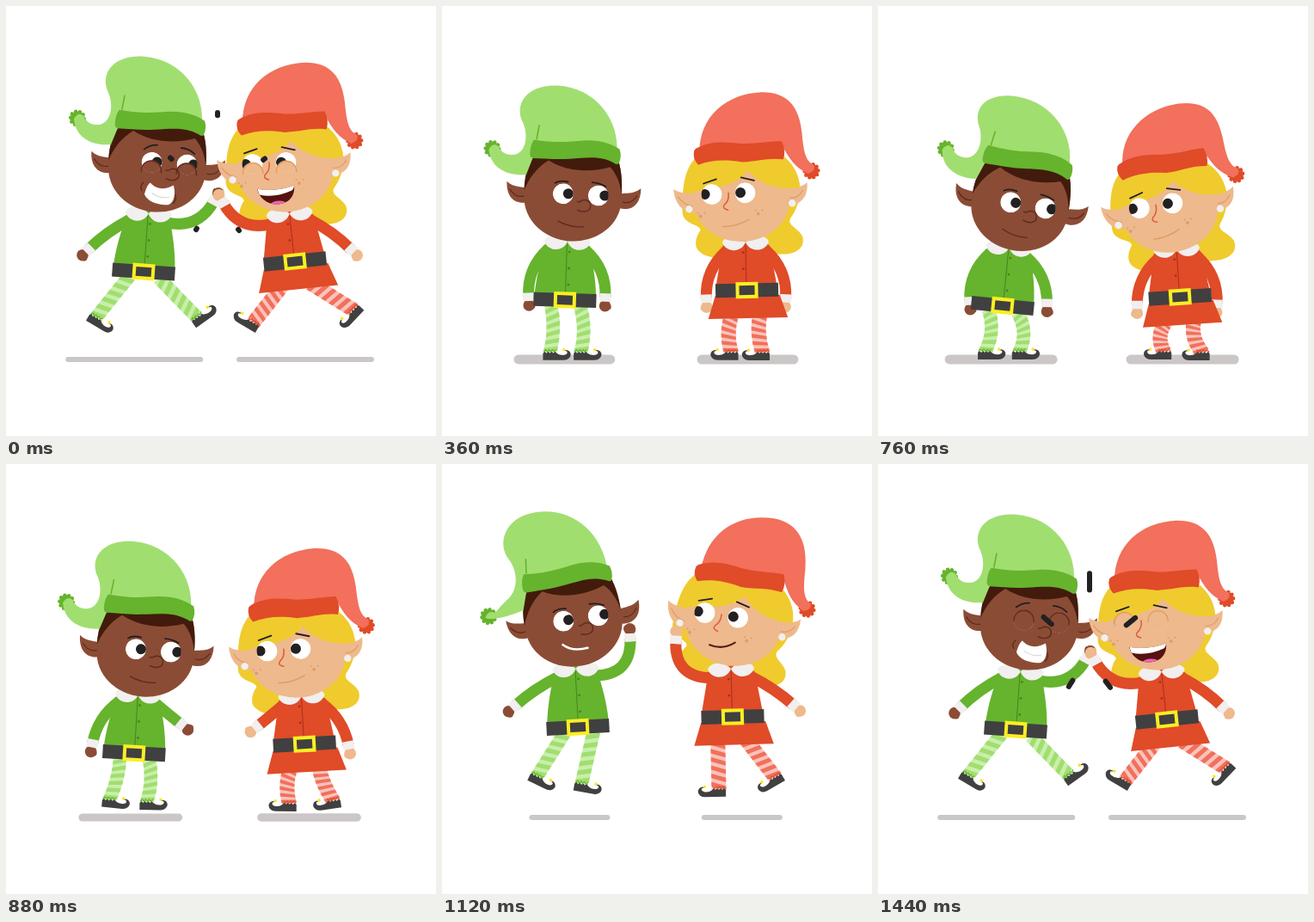
Write an HTML page with a canvas that moves like this. It is 500 by 500 pixels and loops after 1.48 s.

```html
<!DOCTYPE html>
<html lang="en">
<head>
<meta charset="utf-8">
<title>Elf high five</title>
<style>
html, body { margin: 0; width: 100%; height: 100%; overflow: hidden; background: #fff; }
canvas { display: block; width: 100vw; height: 100vh; }
</style>
</head>
<body>
<canvas id="stage" width="500" height="500"></canvas>
<script>
const c = document.getElementById('stage').getContext('2d');
const LOOP = 1480, GROUND = 404, DARK = '#404040', INK = '#232021', WHITE = '#f1efef', YELLOW = '#f0cb2d';

const mix = (a, b, k) => a + (b - a) * k;
const clamp = v => Math.min(1, Math.max(0, v));
const fall = k => k ** 1.7, steady = k => k;
const settle = k => Math.sin(k * Math.PI / 2), smooth = k => k * k * (3 - 2 * k);

const steps = [
  [0, 'hit', fall], [200, 'land', settle], [520, 'rest', steady], [640, 'rest', smooth],
  [780, 'land', steady], [1120, 'wind', smooth], [1220, 'hit', steady], [LOOP, 'hit']
];
// Both elves share these, mirrored: hands measured from the shoulders
const gesture = {
  hit: { trail: [47, 34], reach: [56, -25], shadow: 160 },
  land: { trail: [23, 55], reach: [24, 53], shadow: 132 },
  rest: { trail: [23, 56], reach: [23, 56], shadow: 112 },
  wind: { trail: [49, 33], reach: [42, -44], shadow: 94 }
};
// head and body: x, y, degrees; feet: left x, y, right x, y
const boy = {
  skin: '#8b4c36', main: '#66b32d', hat: '#a1de70', sock: '#c9efab', seam: '#45851c', dir: 1,
  headAt: [146, 220], bodyAt: [142, 339], shoulders: [[121, 280], [164, 280]], hips: [[126, 345], [160, 345]], legWidth: 15.5,
  hit: { head: [175, 191, 4], body: [160, 309, 4], feet: [104, 363, 223, 363] },
  land: { head: [165, 237, 10.5], body: [145, 349, 6], feet: [124, 403, 164, 403] },
  rest: { head: [146, 220, 0], body: [142, 339, 0], feet: [126, 404, 160, 404] },
  wind: { head: [153, 187, -9], body: [158, 306, -3], feet: [110, 364, 162, 373] }
};
const girl = {
  skin: '#eeb98c', main: '#e04b28', hat: '#f2705c', sock: '#f9c4bb', seam: '#a8301a', dir: -1,
  headAt: [352, 220], bodyAt: [356, 327], shoulders: [[333, 281], [379, 281]], hips: [[338, 354], [371, 354]], legWidth: 17,
  hit: { head: [324, 191, -3], body: [336, 297, -6], feet: [287, 369, 405, 354] },
  land: { head: [338, 239, -9], body: [351, 339, -4], feet: [333, 403, 378, 404] },
  rest: { head: [352, 220, 0], body: [356, 327, 0], feet: [338, 404, 371, 404] },
  wind: { head: [338, 186, 8.6], body: [338, 294, -1.5], feet: [322, 379, 388, 365] }
};

const fill = (p, color) => { c.fillStyle = color; c.fill(new Path2D(p)); };
function line(p, color, w, cap = 'round') {
  c.strokeStyle = color; c.lineWidth = w; c.lineCap = cap; c.lineJoin = 'round';
  c.stroke(new Path2D(p));
}
function dot(x, y, r, color, ry = r) {
  c.fillStyle = color; c.beginPath(); c.ellipse(x, y, r, ry, 0, 0, 7); c.fill();
}
function within(at, [x, y, deg], draw) {
  c.save();
  c.translate(x, y); c.rotate(deg * Math.PI / 180); c.translate(-at[0], -at[1]);
  draw();
  c.restore();
}
function place([px, py], [ox, oy], [x, y, deg]) {
  const a = deg * Math.PI / 180, dx = px - ox, dy = py - oy;
  return [x + dx * Math.cos(a) - dy * Math.sin(a), y + dx * Math.sin(a) + dy * Math.cos(a)];
}

// Index of the step that holds at time t
function stepAt(list, t) {
  let i = 0;
  while (i < list.length - 2 && t >= list[i + 1][0]) i++;
  return i;
}
function track(list, t) {
  const i = stepAt(list, t), [a, b] = [list[i], list[i + 1]];
  return mix(a[1], b[1], clamp((t - a[0]) / (b[0] - a[0])));
}
function poseOf(elf, t) {
  const i = stepAt(steps, t), [a, b] = [steps[i], steps[i + 1]];
  const k = a[2]((t - a[0]) / (b[0] - a[0]));
  const from = { ...elf[a[1]], ...gesture[a[1]] }, to = { ...elf[b[1]], ...gesture[b[1]] };
  const pose = {};
  for (const part in from)
    pose[part] = Array.isArray(from[part]) ? from[part].map((v, n) => mix(v, to[part][n], k)) : mix(from[part], to[part], k);
  return pose;
}

function drawShadow(x, width, air) {
  const h = mix(11, 6, air), half = (width - h) / 2;
  line(`M${x - half},411 H${x + half}`, '#cbc7c7', h);
}

// The knee bends forward as far as the leg is shortened; in the air the foot follows the leg
function drawLeg(elf, [hx, hy], ax, ay) {
  const air = clamp((GROUND - ay) / 25), half = (GROUND - elf.hips[0][1]) / 2;
  const d = Math.hypot(ax - hx, ay - hy) / 2;
  const bend = .75 * (1 - air) * Math.sqrt(Math.max(0, half * half - d * d));
  const kx = (hx + ax) / 2 + elf.dir * bend, ky = (hy + ay) / 2, r = elf.legWidth / 2;
  line(`M${hx},${hy} Q${kx},${ky} ${ax},${ay}`, elf.sock, 2 * r, 'butt');
  const edge = (t, side) => {
    t = Math.min(t, 1);
    const u = 1 - t, dx = u * (kx - hx) + t * (ax - kx), dy = u * (ky - hy) + t * (ay - ky), n = side * r / Math.hypot(dx, dy);
    return [u * u * hx + 2 * u * t * kx + t * t * ax - dy * n, u * u * hy + 2 * u * t * ky + t * t * ay + dx * n];
  };
  for (let t = 0; t < .96; t += 1 / 6)
    fill(`M${edge(t, -elf.dir)} L${edge(t + .09, -elf.dir)} L${edge(t + .18, elf.dir)} L${edge(t + .09, elf.dir)}Z`, elf.hat);
  c.save();
  c.translate(ax, ay); c.rotate(.8 * air * Math.atan2(hx - ax, ay - hy)); c.scale(elf.dir, 1);
  fill('M-8,0 l2,-2 2,2 2,-2 2,2 2,-2 2,2 2,-2 2,2 Q12,3 17,2 Q21,1 20,-2 Q18,-3 16,-3 Q20,-5 23,-2 Q26,2 22,6 Q20,8 16,8 H-8Z', DARK);
  line('M-7,-2 l2,-2 2,2 2,-2 2,2 2,-2 2,2 2,-2', elf.main, 1.2);
  dot(16.5, -4, 1.8, '#fbe823');
  c.restore();
}

// The elbow swings from outside to below as the hand rises
function armOf([sx, sy], [dx, dy], side) {
  const x = sx + side * dx, y = sy + dy, d = Math.hypot(dx, dy), bend = side * (11.5 - 27 * dy / 58);
  const bx = (sx + x) / 2 - bend * dy / d, by = (sy + y) / 2 + bend * side * dx / d;
  const len = Math.hypot(x - bx, y - by);
  return { sx, sy, bx, by, x, y, ux: (x - bx) / len, uy: (y - by) / len };
}
function drawHand(elf, { x, y, ux, uy }) {
  dot(x + ux * 10, y + uy * 10, 6.8, elf.skin);
  dot(x + ux * 11 + uy * 4 * elf.dir, y + uy * 11 - ux * 4 * elf.dir, 3.2, elf.skin);
  line(`M${x - ux * 4.5},${y - uy * 4.5} L${x + ux * 5},${y + uy * 5}`, WHITE, 13, 'butt');
}
function drawArm(elf, a) {
  line(`M${a.sx},${a.sy} Q${a.bx},${a.by} ${a.x},${a.y}`, elf.main, 13, 'butt');
  dot(a.sx, a.sy, 6.5, elf.main);
  drawHand(elf, a);
}

function drawCollar(x, y) {
  for (const s of [-1, 1])
    fill(`M${x},${y} C${x + s * 9},${y - 10} ${x + s * 25},${y - 8} ${x + s * 27},${y} C${x + s * 23},${y + 12} ${x + s * 5},${y + 13} ${x},${y}Z`, WHITE);
}
function drawBelt(x, y) {
  fill(`M${x - 36.5},${y - 8} h73 v16 h-73Z`, DARK);
  c.strokeStyle = '#fbee23'; c.lineWidth = 4; c.lineJoin = 'miter';
  c.strokeRect(x - 11, y - 7.5, 22, 15);
}
function boyBody() {
  fill('M118,275 Q143,260 168,275 C173,295 177,312 178,333 H106.500 C108,314 112,295 118,275Z', boy.main);
  line('M142.500,274 V331', boy.seam, 1);
  for (const y of [283, 302, 321]) dot(145.5, y, 1.4, boy.seam);
  drawCollar(143, 271);
  drawBelt(142, 339);
}
function girlBody() {
  fill('M329,275 Q355,260 383,275 L391,322 H320Z', girl.main);
  fill('M319,333 H394 L403,359.500 H310.500Z', girl.main);
  line('M355.500,274 V319', girl.seam, 1);
  for (const y of [283, 302]) dot(352.5, y, 1.4, girl.seam);
  drawCollar(355.5, 271);
  drawBelt(356, 327);
}

function drawEye(x, y, look, lid, skin, edge) {
  c.save();
  c.beginPath(); c.arc(x, y, 12, 0, 7); c.clip();
  dot(x, y, 12, '#fff');
  dot(x + look, y - .5, 6, INK);
  if (lid < 24) dot(x, y + lid, 12.5, skin);
  c.restore();
  if (lid < 14) {
    c.strokeStyle = edge; c.lineWidth = 1.3;
    c.beginPath(); c.arc(x, y + lid, 11.6, Math.PI - .1, .1); c.stroke();
  }
}
function drawPom(x, y, color) {
  dot(x, y, 8, color);
  for (let i = 0; i < 10; i++) dot(x + 7.8 * Math.cos(i * Math.PI / 5), y + 7.8 * Math.sin(i * Math.PI / 5), 2.3, color);
}

// The crown sags or stretches by `sag`; the tail of a hat thrown back hangs down
function boyHead({ smile, lid, mouth }, sag) {
  const crease = '#5d2b1c', hang = Math.max(0, -8 * sag), tx = 50, ty = 166 + hang;
  fill('M69,203 C78,211 88,207 95,211 V226 C80,230 69,222 69,203Z M225,203 C216,211 208,208 200,211 V227 C215,231 226,222 225,203Z', boy.skin);
  line('M73,212 Q80,222 90,219 M221,212 Q215,222 205,220', crease, 1.2);
  const scalp = 'M89.500,212 C89,190 95,175 104,166 H194 C201,178 203,195 203,212';
  fill(scalp + 'Z', boy.skin);
  dot(146.5, 219, 56.5, boy.skin, 49.5);
  fill(scalp + ' C201,199 196,188 188,180 C165,188 137,188 116,176 C103,185 95,197 89.500,212Z', '#421b0d');
  c.save();
  c.translate(5 * smile, -3 * smile);
  drawEye(135, 214, 6, lid, boy.skin, crease);
  drawEye(176, 214, 7.5, lid, boy.skin, crease);
  const b = 4 * smile;
  line(`M125,${202 - b * .6} Q131,${198 - b} 140,${200 - b * 1.6} M168,${199 - b} Q177,${199 - b} 184,${203 - b * .5}`, INK, 1.8);
  line('M152,222 C156,224 156,219 162,220 C169,221 170,231 162,233 Q157,234 153,232', crease, 1.4);
  if (mouth === 2) {
    fill('M135,238 C143,246 153,245 162,239 C165,247 165,258 158,262 C146,264 133,260 129,252 C130,246 132,240 135,238Z', '#fff');
    line('M138,250 Q147,256 158,253', '#d8d4d4', 1);
    line('M127,238 Q122,243 126,248 M163,260 Q167,256 165,250', crease, 1.3);
  } else if (mouth === 1) line('M130,241 Q140,251 158,249', '#fff', 2.6);
  else line('M131,246 Q145,253 161,251', crease, 1.3);
  c.restore();
  drawPom(tx, ty, boy.main);
  fill(`M195,164 C196,${122 + sag} 165,${87.5 + sag} 122,${87.5 + sag} C86,${88 + sag} 72,113 84,134 C92,150 89,172 72,${172 + hang * .3}
    C64,${172 + hang * .5} 60,${168 + hang * .8} ${tx + 7},${ty - 3} Q${tx + 1},${ty - 8} ${tx - 4},${ty + 1}
    C${tx - 1},${188 + hang * .4} 68,${197 + hang * .1} 91,194 L99,170Z`, boy.hat);
  line('M103,136 L101,152', boy.main, 1.6);
  fill('M98,153 C125,156 140,153 155,151 C172,149 187,152 198,159 Q201,167 198,175 Q196,178 192,175 C175,167 160,171 140,173 C125,175 110,174 98,174.500 Q94,174 94,169 Q94,158 98,153Z', boy.main);
}

function girlHair() {
  fill('M300,170 C285,185 284,210 283,232 C284,246 303,246 303,253 C296,262 295,272 300,277 C308,286 322,287 335,285 H395 C412,287 425,279 421,265 C416,255 404,252 408,244 C416,234 420,224 421,208 C420,190 413,180 402,170Z', YELLOW);
}
function girlHead({ smile, lid, mouth }, sag) {
  const crease = '#dd9d68', tx = 435, ty = 190;
  fill('M274,204 C283,211 292,208 302,211 V233 C286,235 274,222 274,204Z M429.500,203 C420,211 412,207 402,211 V228 C420,230 430,222 429.500,203Z', girl.skin);
  line('M279,213 Q284,222 295,225 M424,212 Q418,222 408,220', crease, 1.2);
  dot(352.5, 220, 56, girl.skin, 48.5);
  fill('M300,170 C291,182 287,195 288,208 C322,207 350,201 361,186 C375,204 400,212 421,208 C419,190 412,180 402,170Z', YELLOW);
  dot(291, 228, 4.2, WHITE);
  dot(411, 226.5, 4.2, WHITE);
  c.save();
  c.translate(-3 * smile, -smile);
  drawEye(318, 212, -8, lid, girl.skin, '#e39a5d');
  drawEye(357, 212, -5.5, lid, girl.skin, '#e39a5d');
  line('M309,199 L324,194.500 M353,194 L368,198', INK, 1.8);
  line('M337.500,211 C338,217 336,222 332,225 Q329,229 336,231', '#dd5a43', 1.5);
  for (const x of [304, 371]) { dot(x, 237, 1.9, crease); dot(x - 3, 233, 1, crease); dot(x + 5, 233, 1, crease); }
  if (mouth === 2) {
    const open = 'M322,241 Q345,246 365,239 C366,251 358,260 345,260 C333,260 324,252 322,241Z';
    fill(open, '#55120f');
    c.save();
    c.clip(new Path2D(open));
    dot(346, 261, 10, '#ee62b4', 5);
    fill('M322,240 Q345,246 365,238 Q365,243 362,245 Q342,253 324,248Z', '#fff');
    c.restore();
  } else if (mouth === 1) line('M329,248 Q345,252 358,241', '#5e1a14', 2);
  else line('M329,250 Q345,251 360,243', crease, 1.4);
  c.restore();
  drawPom(tx, ty, girl.main);
  fill(`M306,162 C308,${120 + sag} 340,${95 + sag} 381,${95 + sag} C412,${96 + sag} 424,115 426,145 C427,165 428,178 ${tx + 3},${ty - 7}
    Q${tx + 6},${ty} ${tx - 4},${ty + 3} C${tx - 19},${ty - 5} 410,175 402,158Z`, girl.hat);
  fill('M302,158 C320,149 338,152 355,154.500 C375,156 390,153 402,154 Q407,165 403,175 C385,172 375,176 355,176 C335,172 320,172 304,177 Q297,169 300,160Z', girl.main);
}

function drawElf(elf, t, mood, body, head, back) {
  const p = poseOf(elf, t), spot = point => place(point, elf.bodyAt, p.body);
  const [lx, ly, rx, ry] = p.feet;
  drawShadow(mix(elf.bodyAt[0], p.body[0], .4), p.shadow, clamp((GROUND - Math.max(ly, ry)) / 25));
  if (back) within(elf.headAt, p.head, back);
  drawLeg(elf, spot(elf.hips[0]), lx, ly);
  drawLeg(elf, spot(elf.hips[1]), rx, ry);
  const [near, far] = elf.dir > 0 ? [1, 0] : [0, 1];
  const reach = armOf(spot(elf.shoulders[near]), p.reach, elf.dir);
  drawArm(elf, armOf(spot(elf.shoulders[far]), p.trail, -elf.dir));
  drawArm(elf, reach);
  within(elf.bodyAt, p.body, body);
  within(elf.headAt, p.head, () => head(mood, .4 * elf.dir * p.head[2]));
  if (p.reach[1] < 10) drawHand(elf, reach);
}

// Impact marks: outer end and inner end of each ray
const rays = [[246, 124, 246, 147], [191, 176.5, 202, 186.5], [301, 177.5, 288.5, 187.5], [221, 260, 226.5, 251.5], [271, 261, 264.5, 252.5]];
function drawRays(t) {
  if (t < 30) t += LOOP;
  if (t < 1225) return;
  const far = track([[1220, 2], [1340, .6], [1440, .15], [1480, 0]], t);
  const near = track([[1270, 2], [1440, 1], [1480, .15], [1510, 0]], t);
  for (const [x, y, ix, iy] of rays) {
    const at = u => `${mix(x, ix, u)},${mix(y, iy, u)}`;
    line(`M${at(far)} L${at(near)}`, INK, 6);
  }
}

function draw(t) {
  const mood = {
    smile: track([[0, 1], [120, 0], [1120, 0], [1220, 1], [LOOP, 1]], t),
    lid: track([[0, 10], [80, 26], [1150, 26], [1220, 0], [1440, 0], [LOOP, 10]], t),
    mouth: t < 80 || t >= 1180 ? 2 : t < 140 || t >= 1000 ? 1 : 0
  };
  c.fillStyle = '#fff';
  c.fillRect(0, 0, 500, 500);
  drawElf(boy, t, mood, boyBody, boyHead);
  drawElf(girl, t, mood, girlBody, girlHead, girlHair);
  drawRays(t);
}

function tick() {
  draw(performance.now() % LOOP);
  requestAnimationFrame(tick);
}
draw(0);
requestAnimationFrame(tick);
</script>
</body>
</html>
```
